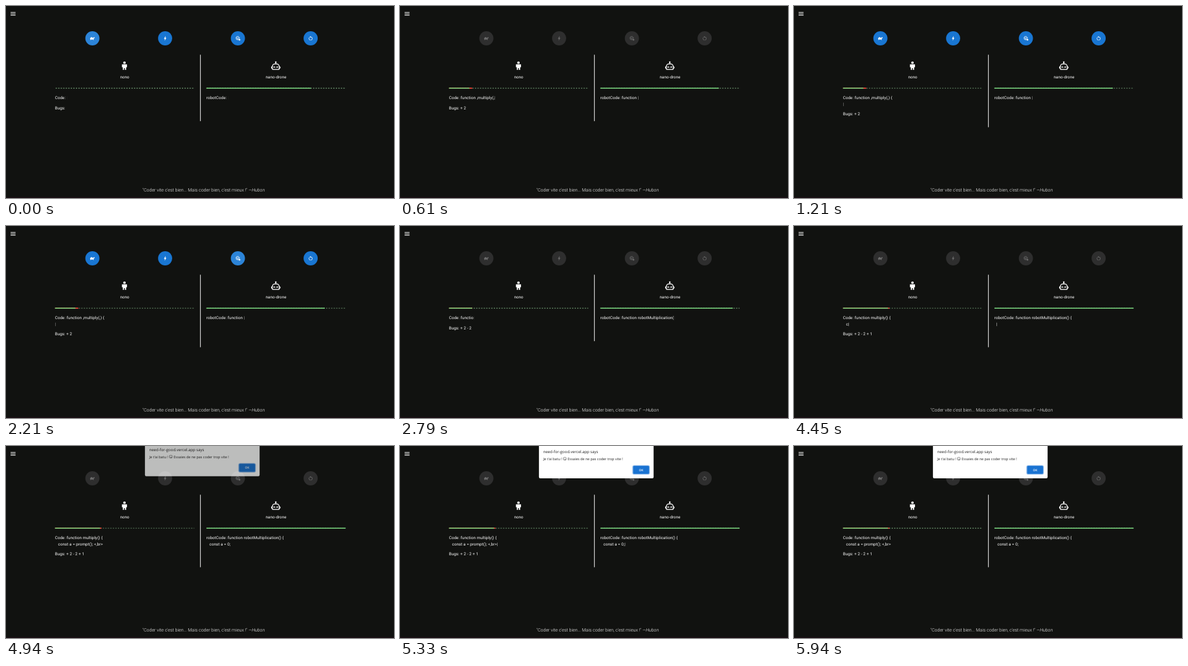
Write an HTML page that moves like this. It is 600x297 px and loops after 6000 ms.

```html
<!DOCTYPE html>
<html lang="fr">
<head>
<meta charset="utf-8">
<title>Duel de code</title>
<style>
html, body { margin: 0; width: 100%; height: 100%; overflow: hidden; background: #111210; }
#stage {
  position: absolute; width: 1536px; height: 760px; transform: scale(.390625); transform-origin: 0 0;
  color: #fff; font: 16px/24px Roboto, sans-serif; letter-spacing: .00938em; text-rendering: geometricPrecision;
}
#stage div, #stage > svg, #stage footer { position: absolute; }
svg { fill: currentColor; }
.fab { top: 100px; width: 56px; height: 56px; border-radius: 50%; }
.fab svg { position: absolute; left: 17px; top: 17px; }
#stage .side { top: 0; width: 552px; height: 500px; }
.side > svg { position: absolute; left: 255px; top: 216px; }
.name { top: 270px; width: 100%; text-align: center; }
.bar { top: 322.56px; width: 100%; height: 5.12px; overflow: hidden; }
.bar div { width: 100%; height: 100%; }
.dots { background: radial-gradient(#67906a 0%, #67906a 22%, transparent 46%) 0 -22.5px / 10px 10px; }
.buffer { background: #f44336; }
.value { background: #70c474; }
.text { top: 352px; white-space: pre; }
p { margin: 0 0 16px; }
#rule { left: 768px; top: 193px; width: 2.56px; background: #d0d0d0; }
footer { left: 540px; top: 717px; font-size: 18.05px; font-weight: 300; letter-spacing: 0; white-space: nowrap; }
#edge { left: 0; top: 757px; width: 100%; height: 4px; background: #1c0d14; }
#alert {
  left: 550px; top: 0; width: 454px; height: 128px; border-radius: 0 0 5px 5px;
  background: #fff; color: #222; font: 13.9px/20px "Open Sans", sans-serif; letter-spacing: 0; white-space: nowrap;
}
#alert b { position: absolute; left: 17px; top: 12px; font-size: 15.5px; font-weight: 500; }
#alert span { position: absolute; left: 17px; top: 42px; }
#alert svg { vertical-align: -2px; fill: none; }
#alert i {
  position: absolute; left: 373px; top: 79px; width: 63px; height: 31px; border-radius: 4px;
  background: #1a73d2; box-shadow: 0 0 0 3px #8db9ea;
  color: #fff; font: 600 12px/31px "Open Sans", sans-serif; text-align: center;
}
</style>
</head>
<body>
<div id="stage">
  <svg style="left:15px;top:18px" width="26" height="26" viewBox="0 0 24 24"><path d="M3 18h18v-2H3zm0-5h18v-2H3zm0-7v2h18V6z"/></svg>
  <div id="rule"></div>
  <div class="side" id="player" style="left:194px">
    <svg width="40" height="40" viewBox="0 0 24 24"><path d="M12 2a3 3 0 0 1 0 6a3 3 0 0 1 0-6M11 22H8v-6H6V9h12v7h-2v6h-3v-4h-2z"/></svg>
    <div class="name">nono</div>
    <div class="bar"><div class="dots"></div><div class="buffer"></div><div class="value"></div></div>
    <div class="text"><p>Code: <span class="code"></span><span class="cursor">|</span></p><p id="bugs"></p></div>
  </div>
  <div class="side" id="robot" style="left:793px">
    <svg width="40" height="40" viewBox="0 0 24 24"><path fill-rule="evenodd" d="M23 15v3a1 1 0 0 1-1 1h-1v1a2 2 0 0 1-2 2H5a2 2 0 0 1-2-2v-1H2a1 1 0 0 1-1-1v-3a1 1 0 0 1 1-1h1a7 7 0 0 1 7-7h1V5.73a2 2 0 1 1 2 0V7h1a7 7 0 0 1 7 7h1a1 1 0 0 1 1 1zM21 16h-2v-2a5 5 0 0 0-5-5h-4a5 5 0 0 0-5 5v2H3v1h2v3h14v-3h2z"/><path d="M6 16.5a2.5 2.5 0 0 1 5 0l-1.3.6-1.2-1.2-1.2 1.2zm7 0a2.5 2.5 0 0 1 5 0l-1.3.6-1.2-1.2-1.2 1.2z"/></svg>
    <div class="name">nano-drone</div>
    <div class="bar"><div class="dots"></div><div class="value"></div></div>
    <div class="text"><p>robotCode: <span class="code"></span><span class="cursor">|</span></p></div>
  </div>
  <footer>"Coder vite c'est bien... Mais coder bien, c'est mieux !" <em>—Hubon</em></footer>
  <div id="edge"></div>
  <div id="alert">
    <b>need-for-good.vercel.app says</b>
    <span>Je t'ai batu ! <svg width="15" height="15" viewBox="0 0 16 16" stroke="#222" stroke-width="1.2"><circle cx="8" cy="8" r="6.8"/><path d="M4 6.5q1-1.5 2 0M10 6.5q1-1.5 2 0M4 9.5q4 4 8 0M9 11.5q2 3 3-1"/></svg> Essaies de ne pas coder trop vite !</span>
    <i>OK</i>
  </div>
</div>
<script>
const $ = (sel, root = document) => root.querySelector(sel);
const stage = $('#stage'), player = $('#player'), robot = $('#robot');
const clamp = x => Math.min(1, Math.max(0, x));
const ramp = (t, start, length) => clamp((t - start) / length);
const mix = (a, b, k) => a.map((v, i) => v + (b[i] - v) * k);
const rgb = c => `rgb(${c.map(Math.round)})`;

const icons = [
  '<path d="M2 14c1-6 4-7 7-7s5 2 6 5l2-4c2-2 5-1 5 1s-2 2-3 2l-2 5 1 3h-3l-2-2H8l-2 2H3l1-3-3-1z"/>',
  '<path d="M11 21h-1l1-7H7.5c-.58 0-.57-.32-.38-.66L13 3h1l-1 7h3.5c.49 0 .56.33.47.51z"/>',
  '<circle cx="11" cy="11" r="6" fill="none" stroke="currentColor" stroke-width="2"/><circle cx="11" cy="11" r="8" fill="none" stroke="currentColor" stroke-width="2.5" stroke-dasharray="2.6 3.68"/><path d="M8 9h6v1.5H8zm0 3h5v1.5H8z"/><circle cx="19" cy="18.5" r="3.5"/>',
  '<path d="M12 5V2L8 6l4 4V7c3.31 0 6 2.69 6 6 0 2.97-2.17 5.43-5 5.91v2.02c3.95-.49 7-3.85 7-7.93 0-4.42-3.58-8-8-8zM6 13c0-1.65.67-3.15 1.76-4.24L6.34 7.34C4.9 8.79 4 10.79 4 13c0 4.08 3.05 7.44 7 7.93v-2.02c-2.83-.48-5-2.94-5-5.91z"/>'
];
const fabs = icons.map((icon, i) => {
  const fab = document.createElement('div');
  fab.className = 'fab';
  fab.style.left = 314 + 288 * i + 'px';
  fab.innerHTML = `<svg width="22" height="22" viewBox="0 0 24 24">${icon}</svg>`;
  stage.insertBefore(fab, $('#alert'));
  return fab;
});

const clicks = [60, 2380, 3880], ready = [780, 3350], reset = 2520;
const blue = [25, 118, 210], light = [44, 132, 216], grey = [46, 46, 46];

// Value after each click, eased linearly like a progress bar.
function level(t, values) {
  return clicks.reduce((v, c, i) => v + (values[i + 1] - values[i]) * ramp(t, c, 400), values[0]);
}
const typed = (text, t, start, delay) => text.slice(0, Math.max(0, Math.floor((t - start) / delay)));

function playerCode(t) {
  if (t < reset) return typed('function ,multiply(,) {\n', t, 110, 25);
  return typed('function multiply() {\n', t, 2610, 25) + typed('   const a = prompt(); <,br>', t, 4360, 20.5);
}
function robotCode(t) {
  return typed('function ', t, 110, 17) + typed('robotMultiplication() {\n', t, 2445, 17)
    + typed('   const a = 0;', t, 4380, 30);
}
function bugText(t) {
  return 'Bugs:' + (t >= 60 ? ' + 2' : '') + (t >= reset ? ' - 2' : '') + (t >= clicks[2] ? ' + 1' : '');
}
function setBar(el, name, percent) {
  $('.' + name, el).style.transform = `translateX(${percent - 100}%)`;
}

function drawFabs(t) {
  const sum = times => times.reduce((s, start) => s + ramp(t, start, 250), 0);
  const off = sum(clicks) - sum(ready);
  const hover = [t < 60 ? 1 : ramp(t, 3600, 150), 0, t < clicks[1] ? ramp(t, 1800, 250) : 0, 0];
  fabs.forEach((fab, i) => {
    fab.style.background = rgb(mix(mix(blue, light, hover[i]), grey, off));
    fab.style.color = rgb(mix([255, 255, 255], [108, 108, 108], off));
  });
}

function draw(t) {
  drawFabs(t);
  const code = playerCode(t);
  $('.code', player).textContent = code;
  $('.code', robot).textContent = robotCode(t);
  $('#bugs').textContent = bugText(t);
  $('#rule').style.height = (code.includes('\n') ? 287 : 263) + 'px';

  setBar(player, 'buffer', level(t, [0, 16.67, 16.67, 33.33]));
  setBar(player, 'value', level(t, [0, 14.67, 16.67, 32.33]));
  setBar(robot, 'value', level(t, [75, 85, 95, 100]));

  const blink = .5 - .5 * Math.cos((t - 920) / 500 * Math.PI);
  document.querySelectorAll('.cursor').forEach(c => c.style.opacity = blink);

  // Dots fade in place, then slide left while brightening.
  const phase = t % 3000 / 3000, slide = ramp(phase, .6, .4);
  document.querySelectorAll('.dots').forEach(d => {
    d.style.opacity = .6 + .4 * (phase < .6 ? 1 - phase / .6 : slide);
    d.style.backgroundPosition = `${-200 * slide}px -22.5px`;
  });

  const shown = 1 - (1 - ramp(t, 4870, 150)) ** 2;
  $('#alert').style.opacity = shown;
  $('#alert').style.transform = `translateY(${-30 * (1 - shown)}px)`;
}

const begin = performance.now();
function tick() {
  draw((performance.now() - begin) % 6000);
  requestAnimationFrame(tick);
}
tick();
</script>
</body>
</html>
```
